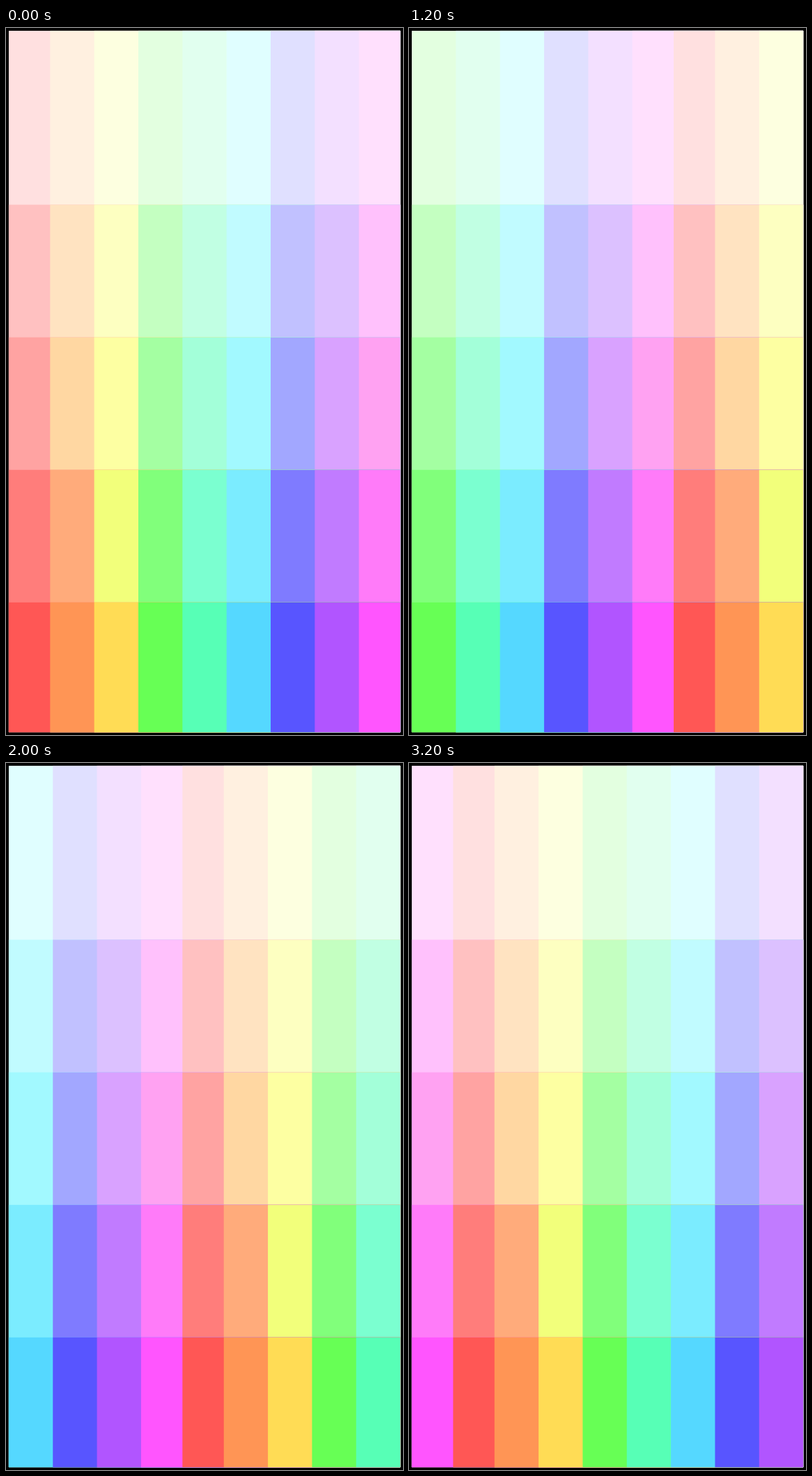
Animation of 561x998 px, one loop 3600 ms. Source, as an HTML page:

```html
<!DOCTYPE html>
<html lang="en">
<head>
<meta charset="utf-8">
<title>Shifting colour columns</title>
<style>
  html, body { margin: 0; width: 100%; height: 100%; overflow: hidden; background: #000; }
  svg { display: block; width: 100vw; height: 100vh; }
</style>
</head>
<body>
<svg id="stage" viewBox="0 0 144 256" preserveAspectRatio="none"></svg>
<script>
const STEP_MS = 400;
const LEFT = 1, RIGHT = 143, BOTTOM = 255;
const rowTops = [1, 64, 112, 160, 208];

// One entry per hue: red, orange, yellow, green, teal, cyan, blue, purple, pink.
const widths = [15, 16, 16, 16, 16, 16, 16, 16, 15];
const palette = [
  'ffe0e0 fff0e0 fdffe0 e3ffe0 e1ffef e0feff e0e0ff f3e0ff ffe0fd',
  'ffc1c1 ffe3c1 fdffc1 c4ffc1 c1ffe3 c1fbff c1c1ff dcc1ff ffc1fc',
  'ffa3a2 ffd7a2 fdffa2 a4ffa2 a3ffd9 a2f9ff a2a7ff d9a2ff ffa2f2',
  'ff7d7b ffab7b f2ff7b 81ff7b 7bffd0 7becff 7f7bff c17bff ff7bf9',
  'ff5755 ff9555 ffdc55 67ff55 57ffb6 55d8ff 5855ff b155ff ff55fe'
].map(row => row.split(' '));

const stage = document.getElementById('stage');

function addRect(x, y, width, height, fill) {
  const rect = document.createElementNS('http://www.w3.org/2000/svg', 'rect');
  const attrs = { x, y, width, height, fill };
  for (const name in attrs) rect.setAttribute(name, attrs[name]);
  stage.append(rect);
  return rect;
}

// Cells reach to the right and bottom and are overlapped by the next, so no seams show.
const cells = rowTops.map(top =>
  widths.map(() => addRect(LEFT, top, 1, BOTTOM - top, '#000')));

function draw(shift) {
  let x = LEFT;
  for (let col = 0; col < widths.length; col++) {
    const hue = (col + shift) % widths.length;
    cells.forEach((row, r) => {
      row[col].setAttribute('x', x);
      row[col].setAttribute('width', RIGHT - x);
      row[col].setAttribute('fill', '#' + palette[r][hue]);
    });
    x += widths[hue];
  }
}

let shown = -1;
function tick() {
  const shift = Math.floor(performance.now() / STEP_MS) % widths.length;
  if (shift !== shown) draw(shown = shift);
  requestAnimationFrame(tick);
}
tick();
</script>
</body>
</html>
```
